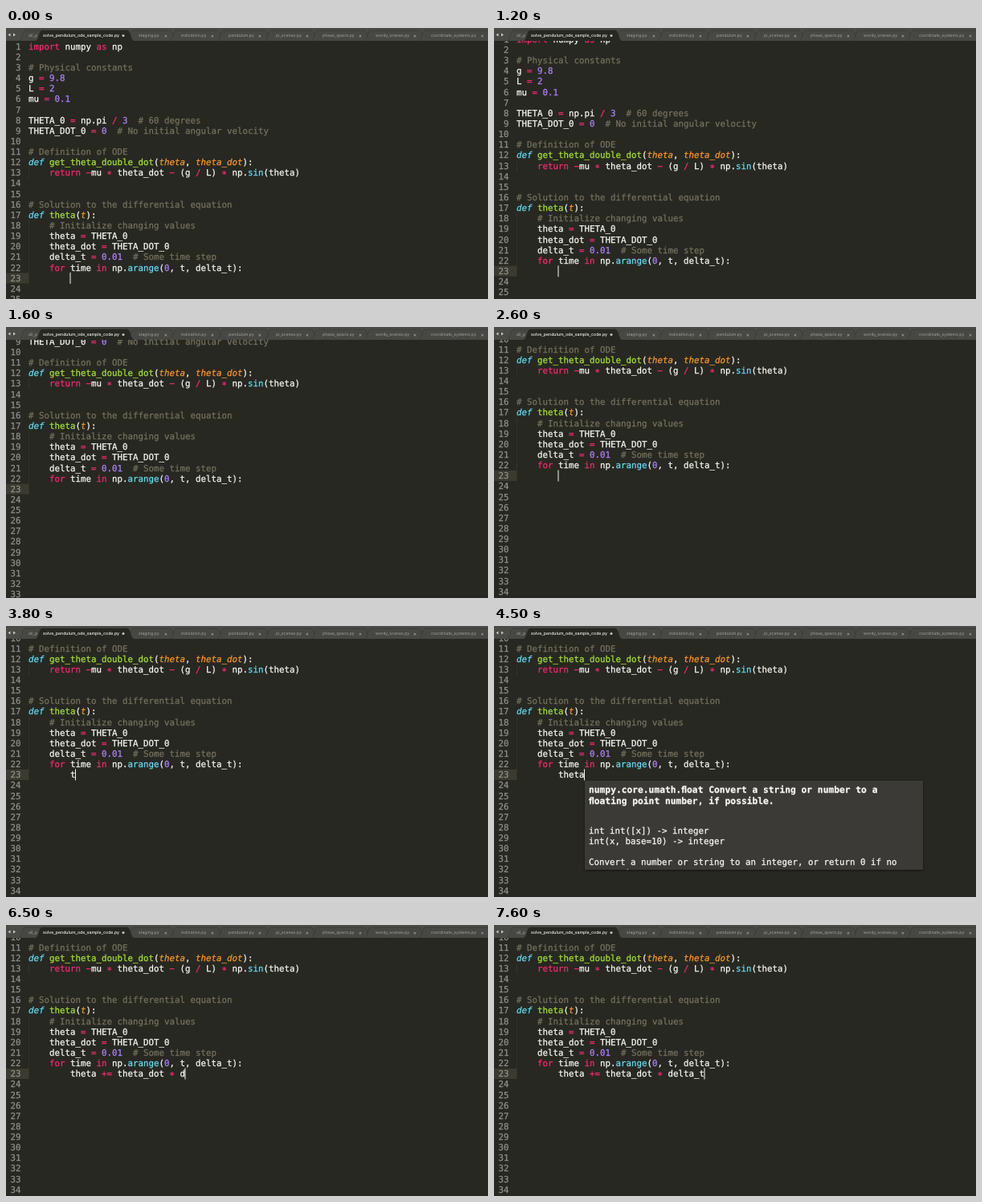
Write an HTML page with a canvas that moves like this. It is 600 px wide and 338 px high and loops after 8000 ms.

```html
<!DOCTYPE html>
<html lang="en">
<head>
<meta charset="utf-8">
<style>
html, body { margin: 0; width: 100%; height: 100%; overflow: hidden; background: #272822; }
canvas { display: block; }
</style>
</head>
<body>
<canvas id="stage" width="600" height="338"></canvas>
<script>
const ctx = document.getElementById('stage').getContext('2d');
const LOOP = 8000, STEP = 100;
const CHAR = 6.5, LINE = 13.135, LEFT = 28, FIRST_ROW = 23, CARET_LINE = 23, LAST_LINE = 36;
const MONO = '"DejaVu Sans Mono", monospace';
const SANS = 'Inter, "Liberation Sans", sans-serif';

const code = `import numpy as np

# Physical constants
g = 9.8
L = 2
mu = 0.1

THETA_0 = np.pi / 3  # 60 degrees
THETA_DOT_0 = 0  # No initial angular velocity

# Definition of ODE
def get_theta_double_dot(theta, theta_dot):
    return -mu * theta_dot - (g / L) * np.sin(theta)


# Solution to the differential equation
def theta(t):
    # Initialize changing values
    theta = THETA_0
    theta_dot = THETA_DOT_0
    delta_t = 0.01  # Some time step
    for time in np.arange(0, t, delta_t):`.split('\n');
const typedText = 'theta += theta_dot * delta_t';

const styles = {
  comment: ['#75715e', ''],
  def: ['#66d9ef', 'italic '],
  name: ['#a6e22e', ''],
  param: ['#fd971f', 'italic '],
  keyword: ['#f92672', ''],
  call: ['#66d9ef', ''],
  number: ['#ae81ff', ''],
  plain: ['#f8f8f2', '']
};
const tokens = new RegExp([
  '(?<comment>#.*)',
  '(?<def>\\bdef\\b)',
  '(?<name>(?<=def )\\w+)',
  '(?<param>(?<=def .*\\(.*)\\w+)',
  '(?<keyword>\\b(?:import|as|return|for|in)\\b|[-+*/=]+)',
  '(?<call>(?<=np\\.)(?:sin|arange))',
  '(?<number>\\b\\d[\\d.]*)',
  '(?<plain>\\w+|[^\\s\\w])'
].join('|'), 'g');

// [title, text x, close mark x, left edge, right edge]
const tabs = [
  ['all_p', 28, 0, 20, 45],
  ['staging.py', 165, 199, 155, 208],
  ['indication.py', 218, 257, 208, 267],
  ['pendulum.py', 277, 316, 267, 326],
  ['pi_scenes.py', 336, 375, 326, 384],
  ['phase_space.py', 394, 441, 384, 450],
  ['wordy_scenes.py', 460, 509, 450, 518],
  ['coordinate_systems.py', 529, 593, 518, 602]
];

const typing = [[3700, 0], [4200, 5], [4600, 5], [5000, 9], [5600, 9],
                [6300, 21], [6400, 21], [6800, 27], [6900, 27], [7000, 28]];
const caretOn = [[-999, 0], [450, 1250], [1800, 2650], [3150, 5400], [5650, 9999]];
const popupTime = [4300, 4700];

const clamp = v => Math.max(0, Math.min(1, v));
const rowY = line => FIRST_ROW + (line - 1) * LINE;

function scrollAt(t) {
  const u = clamp((t - 1095) / 653);
  return 126.4 * u * u * (3 - 2 * u);
}

function typedAt(t) {
  const next = typing.findIndex(key => key[0] > t);
  if (next === 0) return 0;
  if (next < 0) return typedText.length;
  const [t0, n0] = typing[next - 1], [t1, n1] = typing[next];
  return Math.floor(n0 + (n1 - n0) * (t - t0) / (t1 - t0) + 1e-6);
}

function caretAlpha(t) {
  return Math.max(...caretOn.map(([on, off]) =>
    Math.min(clamp((t - on) / 150), clamp(1 + (off - t) / 100))));
}

function text(str, x, y, color, font, align = 'left') {
  ctx.font = font;
  ctx.fillStyle = color;
  ctx.textAlign = align;
  ctx.fillText(str, x, y);
}

// Monospaced text with slightly thickened stems.
function monoText(str, x, y, color, style = '10.8px', align = 'left') {
  text(str, x, y, color, `${style} ${MONO}`, align);
  ctx.strokeStyle = color;
  ctx.lineWidth = 0.25;
  ctx.strokeText(str, x, y);
}

function rect(x, y, w, h, color) {
  ctx.fillStyle = color;
  ctx.fillRect(x, y, w, h);
}

function drawCode(str, baseline) {
  for (const match of str.matchAll(tokens)) {
    const kind = Object.keys(styles).find(key => match.groups[key] !== undefined);
    const [color, slant] = styles[kind];
    const glyphs = match[0].replace('-', '\u2212').replace('*', '\u2217');
    monoText(glyphs, LEFT + match.index * CHAR, baseline, color, `${slant}10.8px`);
  }
}

function drawEditor(t) {
  const scroll = scrollAt(t);
  const typed = typedText.slice(0, typedAt(t));
  const caretY = rowY(CARET_LINE) - scroll;
  rect(0, 0, 600, 338, '#272822');
  rect(0, caretY - 6.5, LEFT, 13, '#3b3a31');

  for (const [from, to] of [[13, 13], [18, 23]]) {
    rect(LEFT, rowY(from) - 6.5 - scroll, 0.6, (to - from + 1) * LINE, '#3b3c35');
  }
  for (let line = 1; line <= LAST_LINE; line++) {
    const baseline = rowY(line) + 3.7 - scroll;
    monoText(line, 18.5, baseline, '#90908a', '10.8px', 'right');
    const str = line === CARET_LINE ? ' '.repeat(8) + typed : code[line - 1];
    if (str) drawCode(str, baseline);
  }
  ctx.globalAlpha = caretAlpha(t);
  rect(LEFT + (8 + typed.length) * CHAR - 0.5, caretY - 7, 1, 14, '#f8f8f0');
  ctx.globalAlpha = 1;
}

function drawPopup() {
  ctx.save();
  ctx.shadowColor = 'rgba(0,0,0,.5)';
  ctx.shadowBlur = 3;
  ctx.shadowOffsetY = 1;
  rect(113, 193, 421, 111, '#3b3a36');
  ctx.restore();
  ctx.save();
  ctx.beginPath();
  ctx.rect(113, 193, 421, 111);
  ctx.clip();
  [
    ['numpy.core.umath.\ufb02oat Convert a string or number to a', 208, 'bold 11.28px'],
    ['\ufb02oating point number, if possible.', 221.5, 'bold 11.28px'],
    ['int int([x]) -> integer', 258.5],
    ['int(x, base=10) -> integer', 272],
    ['Convert a number or string to an integer, or return 0 if no', 298],
    ['arguments', 311]
  ].forEach(([str, y, style]) => monoText(str, 118, y, '#f8f8f2', style));
  ctx.restore();
}

function tabShape(left, right, fill, edge) {
  ctx.beginPath();
  ctx.moveTo(left - 4, 16);
  ctx.bezierCurveTo(left, 16, left, 3, left + 4, 3);
  ctx.lineTo(right - 4, 3);
  ctx.bezierCurveTo(right, 3, right, 16, right + 4, 16);
  ctx.fillStyle = fill;
  ctx.fill();
  ctx.strokeStyle = edge;
  ctx.lineWidth = 0.6;
  ctx.stroke();
}

function arrow(tip, base) {
  ctx.beginPath();
  ctx.moveTo(tip, 8.5);
  ctx.lineTo(base, 6.5);
  ctx.lineTo(base, 10.5);
  ctx.fillStyle = '#c8c8c4';
  ctx.fill();
}

function drawTabs() {
  rect(0, 0, 600, 16, '#4a4b47');
  for (const [title, x, close, left, right] of tabs) {
    tabShape(left, right, '#474844', '#363732');
    text(title, x, 11.3, '#a0a09c', `5.2px ${SANS}`);
    if (close) text('×', close, 11.6, '#b4b4b0', `6.5px ${SANS}`, 'center');
  }
  tabShape(41, 155, '#272822', '#24251f');
  text('solve_pendulum_ode_sample_code.py', 46, 11.3, '#f4f4f0', `500 5.2px ${SANS}`);
  ctx.beginPath();
  ctx.arc(146, 9.5, 1.5, 0, Math.PI * 2);
  ctx.fillStyle = '#c8c8c4';
  ctx.fill();
  arrow(2.5, 5.5);
  arrow(12, 9);
}

function draw(now) {
  const t = Math.floor((now % LOOP) / STEP) * STEP;
  drawEditor(t);
  if (t >= popupTime[0] && t < popupTime[1]) drawPopup();
  drawTabs();
}

// The tiny skew keeps text baselines from snapping to whole pixels.
ctx.setTransform(1, 1e-5, 0, 1, 0, 0);
ctx.textRendering = 'geometricPrecision';

const start = performance.now();
function tick() {
  draw(performance.now() - start);
  requestAnimationFrame(tick);
}
tick();
</script>
</body>
</html>
```
